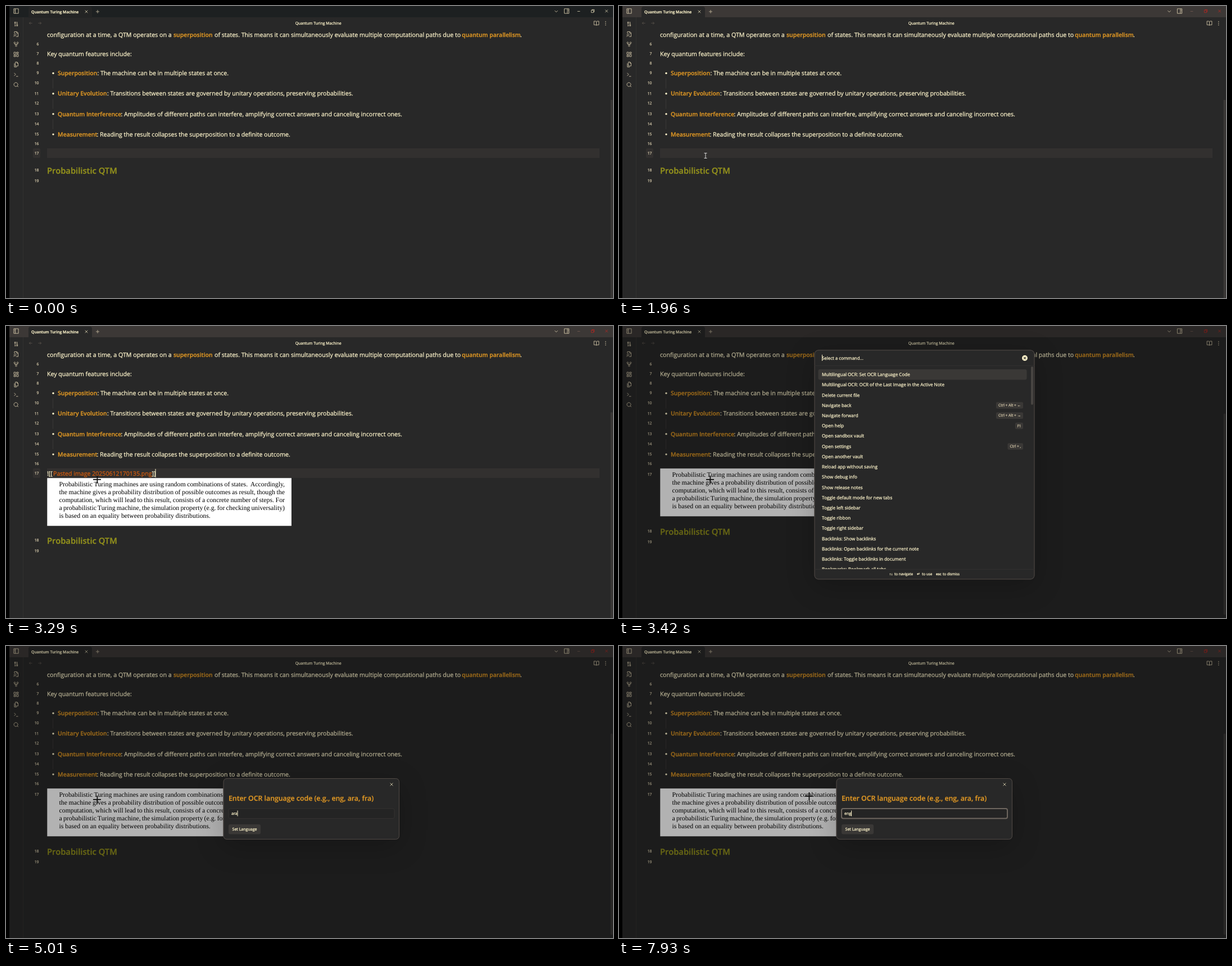
Animation of 1080x519 px, one loop 8000 ms. Source, as an HTML page with a canvas:

```html
<!DOCTYPE html>
<html lang="en">
<head>
<meta charset="utf-8">
<title>Notes</title>
<style>
html, body { margin: 0; width: 100%; height: 100%; overflow: hidden; background: #000; }
canvas { display: block; }
</style>
</head>
<body>
<canvas id="stage" width="1080" height="519"></canvas>
<script>
const ctx = document.getElementById('stage').getContext('2d');
const SANS = '"Open Sans", "Noto Sans", sans-serif';
const SERIF = '"Liberation Serif", serif';
const CREAM = '#fff5cc', GOLD = '#df9724', OLIVE = '#94921c', BG = '#282828',
  LINE = '#3a3836', EDGE = '#504945', MUTED = '#d0c4a6', RED = '#cc241d';

// Times (ms)
const LOOP = 8000, ENTER = 260, FOCUS = 1430, PASTE = 2230, PALETTE = 3420, DIALOG = 5010,
  PRESS = 6400, SELECT = 6470, RELEASE = 6870, TYPE = [7200, 7400, 7530], BLINK = 530;

const pointerPath = [
  [ENTER, 1005, 512], [460, 720, 440], [660, 260, 310], [830, 70, 243], [1030, 157, 264],
  [1230, 154, 266], [2490, 154, 266], [2830, 162, 273], [5550, 162, 273], [5800, 240, 266],
  [6130, 412, 312], [6330, 427, 297], [6399, 427, 297], [PRESS, 404, 296], [6469, 404, 296],
  [SELECT, 390, 296], [6670, 390, 296], [RELEASE, 377, 299], [7929, 377, 299],
  [7930, 338, 267], [LOOP, 338, 267]
];

// Icon outlines on a 24 unit grid
const icons = {
  left: 'M3 3h18v18H3zM9 3v18M5.5 8h1.5M5.5 12h1.5',
  right: 'M3 3h18v18H3zM15 3v18M17 8h2M17 12h2',
  binary: 'M14 14h4v6h-4zM6 4h4v6H6zM6 20h4M14 10h4M6 14h2v6M14 4h2v6',
  fileSearch: 'M5 9V2h10l5 5v15h-8M14 2v6h6M8 11a4 4 0 1 0 .1 0M2 22l3-4',
  fork: 'M6 3a3 3 0 1 0 .1 0M18 3a3 3 0 1 0 .1 0M12 15a3 3 0 1 0 .1 0M6 9v3h12V9M12 12v3',
  grid: 'M3 3h7v9H3zM14 3h7v5h-7zM14 12h7v9h-7zM3 16h7v5H3z',
  files: 'M20 7h-4V2H9v16h11zM16 2l4 5M5 7v15h10',
  terminal: 'M4 17l6-6-6-6M12 19h8',
  search: 'M11 3a8 8 0 1 0 .1 0M21 21l-4.5-4.5',
  chevron: 'M6 9l6 6 6-6',
  minus: 'M5 12h14',
  restore: 'M4 8h12v12H4zM8 8V4h12v12h-4',
  close: 'M5 5l14 14M19 5L5 19',
  plus: 'M4 12h16M12 4v16',
  back: 'M20 12H4M11 5l-7 7 7 7',
  forward: 'M4 12h16M13 5l7 7-7 7',
  book: 'M12 6v15M2 4h7l3 2 3-2h7v15h-7l-3 2-3-2H2z'
};
for (const name in icons) icons[name] = new Path2D(icons[name]);

function icon(name, x, y, color = MUTED, size = 10.5, weight = 2) {
  ctx.save();
  ctx.translate(x - size / 2, y - size / 2);
  ctx.scale(size / 24, size / 24);
  ctx.strokeStyle = color;
  ctx.lineWidth = weight;
  ctx.stroke(icons[name]);
  ctx.restore();
}

function box(x, y, w, h, fill, radius = 0, stroke, width = 1) {
  ctx.beginPath();
  ctx.roundRect(x, y, w, h, radius);
  if (fill) { ctx.fillStyle = fill; ctx.fill(); }
  if (stroke) { ctx.strokeStyle = stroke; ctx.lineWidth = width; ctx.stroke(); }
}

function dot(x, y, r, color) {
  ctx.beginPath();
  ctx.arc(x, y, r, 0, 7);
  ctx.fillStyle = color;
  ctx.fill();
}

// y is the middle of the line; a hairline stroke firms up the light sans text
function text(str, x, y, size = 10.6, color = CREAM, weight = 400, align = 'left', family = SANS) {
  ctx.font = `${weight} ${size}px ${family}`;
  ctx.textAlign = align;
  ctx.fillStyle = ctx.strokeStyle = color;
  ctx.lineWidth = 0.25;
  ctx.fillText(str, x, y + size * 0.35);
  if (family === SANS) ctx.strokeText(str, x, y + size * 0.35);
}
const strong = (str, x, y) => text(str, x, y, 10.45, GOLD, 600);

function windowFrame(focused) {
  box(6, 0, 1074, 519, BG);
  box(6, 0, 1074, 20, focused ? '#3c3836' : '#1d2021');
  box(40, 1, 113, 20, focused ? BG : '#232424', [4, 4, 0, 0]);
  box(30, 20, 1, 499, '#32302f');
  text('Quantum Turing Machine', 45, 10.5, 6.85, CREAM, 600);
  icon('close', 143, 10, CREAM, 8);
  icon('plus', 163, 10, MUTED, 9);
  icon('left', 18, 9, MUTED, 11);
  ['binary', 'fileSearch', 'fork', 'grid', 'files', 'terminal', 'search']
    .forEach((name, i) => icon(name, 18, 32 + 18 * i));
  icon('chevron', 979, 9.5);
  icon('right', 997.5, 9, MUTED, 11);
  icon('minus', 1019, 9.5, focused ? '#80635a' : CREAM, 8);
  icon('restore', 1044, 9, focused ? RED : CREAM, 8);
  icon('close', 1068.5, 9, focused ? RED : CREAM, 8);
  icon('back', 44, 30.5, '#665c54', 8);
  icon('forward', 60, 30.5, '#665c54', 8);
  text('Quantum Turing Machine', 555.7, 30.5, 6.9, CREAM, 400, 'center');
  icon('book', 1050.5, 30.5);
  for (const dy of [-3, 0, 3]) dot(1066.8, 30.7 + dy, 0.8, MUTED);
}

function pastedImage(top) {
  box(73.3, top + .3, 434.6, 85, '#fff');
  const lines = [
    'Probabilistic Turing machines are using random combinations of states.  Accordingly,',
    'the machine gives a probability distribution of possible outcomes as result, though the',
    'computation, which will lead to this result, consists of a concrete number of steps. For',
    'a probabilistic Turing machine, the simulation property (e.g. for checking universality)',
    'is based on an equality between probability distributions.'
  ];
  lines.forEach((line, i) => {
    ctx.font = `11.8px ${SERIF}`;
    const gap = (401.5 - ctx.measureText(line).width) / (line.split(' ').length - 1);
    ctx.wordSpacing = i < 4 ? gap + 'px' : '0px';
    text(line, 94.5, top + 11 + 14 * i, 11.8, '#000', 400, 'left', SERIF);
    ctx.wordSpacing = '0px';
  });
}

function note(t) {
  const pasted = t >= PASTE, editing = t < PALETTE;
  const shift = !pasted ? 0 : editing ? 89 : 72.5;

  text('configuration at a time, a QTM operates on a', 73, 51.5, 10.7);
  strong('superposition', 298, 51.5);
  text('of states. This means it can simultaneously evaluate multiple computational paths due to', 371, 51.5);
  strong('quantum parallelism', 811, 51.5);
  text('.', 915, 51.5);
  text('Key quantum features include:', 73, 85.5);

  [
    ['Superposition', 162.5, 'The machine can be in multiple states at once.'],
    ['Unitary Evolution', 180, 'Transitions between states are governed by unitary operations, preserving probabilities.'],
    ['Quantum Interference', 204.5, 'Amplitudes of different paths can interfere, amplifying correct answers and canceling incorrect ones.'],
    ['Measurement', 161.5, 'Reading the result collapses the superposition to a definite outcome.']
  ].forEach(([term, end, rest], i) => {
    const y = 119.5 + 36.2 * i;
    dot(84, y, 1.7, CREAM);
    strong(term, 92, y);
    text(':', end, y);
    text(rest, end + 5.5, y);
    if (i < 3) box(83, y + 9, 1, 18, LINE);
  });

  if (editing) {
    box(73, 253, 983, 17, '#32302f');
    box(48, 253, 13, 17, '#32302f', 2);
  }
  const rows = [68, 85, 102, 119, 137, 155.5, 173, 191.5, 209.5, 228, 245,
    editing ? 262 : 264, 292 + shift, 311 + shift];
  rows.forEach((y, i) => text(i + 6, 58.5, y, 6.8, MUTED, 400, 'right'));

  if (pasted && editing) {
    const hover = t >= 2490 && t < 2760;
    text('![[', 73, 262);
    text('Pasted image 20250612170135.png', 84, 262, 10.6, hover ? '#fe8019' : '#d65d0e');
    text(']]', 259.5, 262);
  }
  if (pasted) pastedImage(editing ? 270 : 253);
  text('Probabilistic QTM', 73, 293.3 + shift, 14.75, OLIVE, 600);

  if (editing && t >= FOCUS) caret(pasted ? 265.5 : 73, 254, 15, t - (pasted ? PASTE : FOCUS));
  const top = !pasted ? 167 : editing ? 153.5 : 155.5;
  box(1075.5, top, 4, editing ? 519 - top : 358, LINE, editing ? 0 : 2);
}

function caret(x, y, h, age) {
  if (age % (2 * BLINK) < BLINK) box(x, y, 1, h, CREAM);
}

function panel(x, y, w, h, radius) {
  ctx.save();
  ctx.shadowColor = 'rgba(0,0,0,.22)';
  ctx.shadowBlur = 50;
  ctx.shadowOffsetY = 12;
  box(x, y, w, h, BG, radius);
  ctx.restore();
  box(x + .5, y + .5, w - 1, h - 1, null, radius, EDGE);
}

function palette(t) {
  panel(347.5, 42.5, 392, 408, 7);
  text('Select a command...', 361, 57, 7.9);
  caret(361, 51, 11, t - PALETTE);
  dot(722, 57, 4.9, CREAM);
  icon('close', 722, 57, BG, 7, 3.5);
  box(348, 70, 391, 1, '#32302f');
  box(354.5, 77, 371, 18.5, LINE, 3);
  box(733, 72, 4, 68, '#484542', 2);

  ctx.save();
  ctx.beginPath();
  ctx.rect(348, 71, 391, 361);
  ctx.clip();
  [
    'Multilingual OCR: Set OCR Language Code',
    'Multilingual OCR: OCR of the Last Image in the Active Note',
    'Delete current file', 'Navigate back', 'Navigate forward', 'Open help',
    'Open sandbox vault', 'Open settings', 'Open another vault',
    'Reload app without saving', 'Show debug info', 'Show release notes',
    'Toggle default mode for new tabs', 'Toggle left sidebar', 'Toggle ribbon',
    'Toggle right sidebar', 'Backlinks: Show backlinks',
    'Backlinks: Open backlinks for the current note',
    'Backlinks: Toggle backlinks in document', 'Bookmarks: Bookmark all tabs'
  ].forEach((name, i) => text(name, 361, 86.3 + 18.22 * i, 8.05));
  [[3, 48, 'Ctrl + Alt + ←'], [4, 48, 'Ctrl + Alt + →'], [5, 14, 'F1'], [7, 27.5, 'Ctrl + ,']]
    .forEach(([row, w, keys]) => {
      const y = 86.3 + 18.22 * row;
      box(719 - w, y - 5.7, w, 11.5, LINE, 2);
      text(keys, 719 - w / 2, y, 6.6, MUTED, 400, 'center');
    });
  ctx.restore();

  box(348, 432, 391, 1, '#32302f');
  text('↑↓', 481, 441, 6, CREAM, 600);
  text('to navigate', 490, 441, 6.4);
  text('↵', 530, 441, 6.4, CREAM, 600);
  text('to use', 539, 441, 6.4);
  text('esc', 564, 441, 6.2, CREAM, 600);
  text('to dismiss', 576, 441, 6.4);
}

function dialog(t) {
  panel(386.5, 235, 313.5, 109, 6);
  icon('close', 686, 246, CREAM, 8.5);
  text('Enter OCR language code (e.g., eng, ara, fra)', 396, 271, 12.3, GOLD, 600);

  box(396, 289, 295, 17.5, '#242424', 3, '#32302f');
  ctx.globalAlpha = Math.min(1, (t - DIALOG) / 140);
  box(396, 289, 295, 17.5, null, 3, '#6e665f', 2);
  ctx.globalAlpha = 1;

  const typed = TYPE.filter(at => t >= at).length;
  const selected = t >= SELECT && !typed;
  const value = typed ? 'eng'.slice(0, typed) : 'ara';
  if (selected) box(401, 292, 10, 10.5, EDGE);
  text(value, 401, 297.5, 7);
  if (!selected) {
    const since = typed ? TYPE[typed - 1] : t >= PRESS ? PRESS : DIALOG;
    caret(401 + ctx.measureText(value).width, 292.5, 10, t - since);
  }

  box(396, 317, 57, 17.5, LINE, 3);
  text('Set Language', 424.5, 326, 7.05, CREAM, 400, 'center');
}

function pointer(t) {
  if (t < ENTER) return;
  const next = Math.max(1, pointerPath.findIndex(p => p[0] > t));
  const [t0, x0, y0] = pointerPath[next - 1], [t1, x1, y1] = pointerPath[next];
  const k = (t - t0) / (t1 - t0), x = x0 + (x1 - x0) * k, y = y0 + (y1 - y0) * k;

  if ((t >= FOCUS && t < 1500) || (t >= PRESS && t < RELEASE)) dot(x, y, 7, 'rgba(215,205,30,.75)');
  if (t > 2690 && x < 387) {
    box(x - 7, y - 1, 14, 1.8, '#111');
    box(x - .5, y - 7, 1.8, 14, '#111');
  } else {
    box(x - .5, y - 4.5, 1, 9, '#d8d8d8');
    for (const side of [-5, 4]) box(x - 2.5, y + side, 5, 1, '#d8d8d8');
  }
}

function draw(now) {
  const t = now % LOOP;
  ctx.textRendering = 'geometricPrecision';
  ctx.lineJoin = 'round';
  box(0, 0, 1080, 519, '#000');
  windowFrame(t >= FOCUS);
  note(t);
  if (t >= PALETTE) {
    box(0, 0, 1080, 519, 'rgba(0,0,0,.3)');
    (t < DIALOG ? palette : dialog)(t);
  }
  pointer(t);
}

const start = performance.now();
function tick() {
  draw(performance.now() - start);
  requestAnimationFrame(tick);
}
tick();
</script>
</body>
</html>
```
